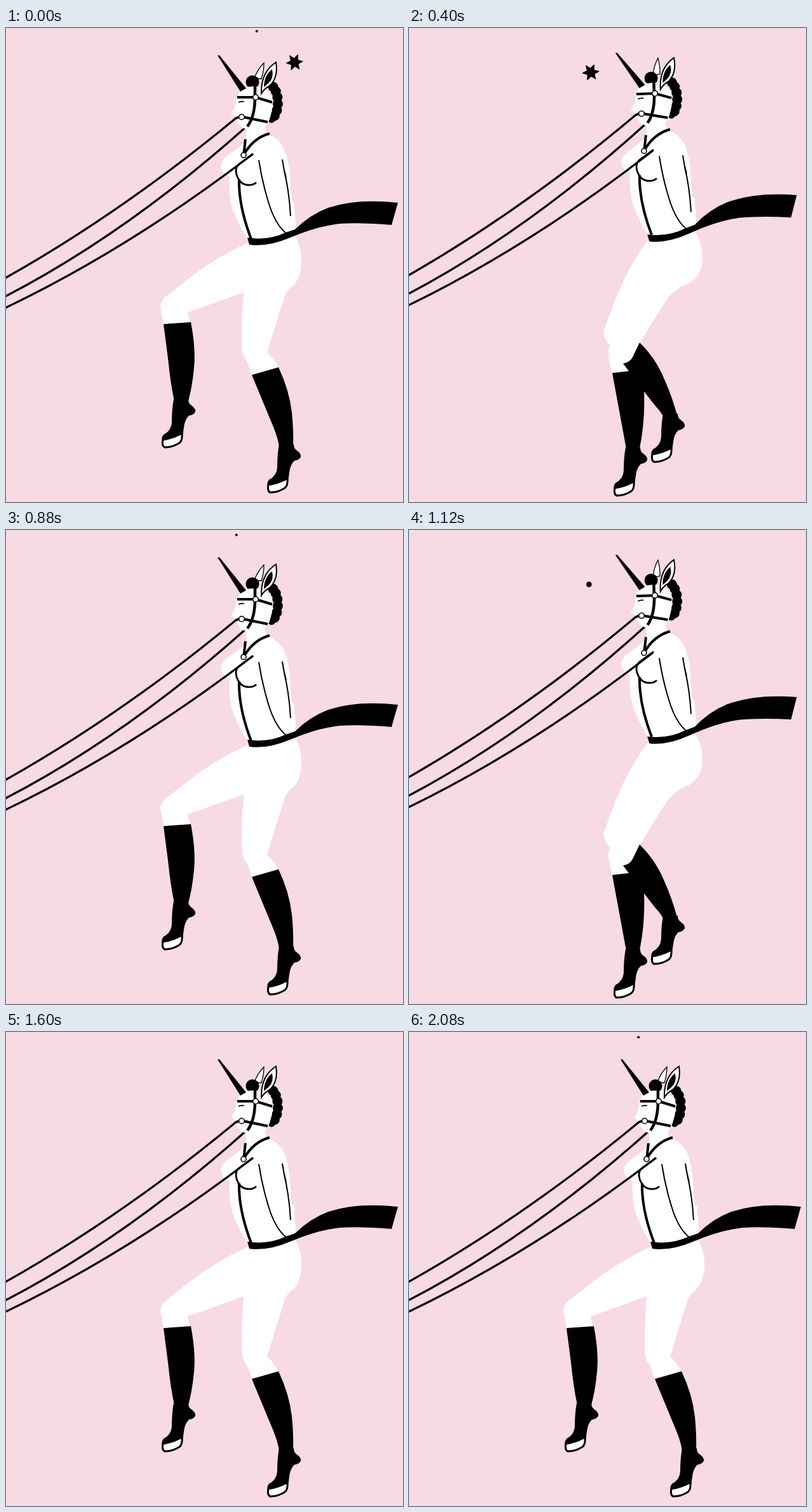
Write an HTML page that moves like this. It is 625x746 px and loops after 2160 ms.

```html
<!DOCTYPE html>
<html lang="en">
<head>
<meta charset="utf-8">
<title>Prancing unicorn</title>
<style>
  html, body { margin: 0; width: 100%; height: 100%; overflow: hidden; background: #f8dae2; }
  svg { display: block; width: 100vw; height: 100vh; }
  .line { fill: none; stroke: #000; stroke-linejoin: round; }
  .white { fill: #fff; }
  .ring { fill: #fff; stroke: #000; stroke-width: 1.6; }
</style>
</head>
<body>
<svg viewBox="0 0 625 746" preserveAspectRatio="none">
  <defs>
    <g id="shoe">
      <path d="M264 584H287Q287 591 292 594Q299 599 298 604Q296 609 288 610Q281 617 280 629L278 643L246 652Q244 645 248 640Q260 634 261 621Q261 600 264 584Z"/>
      <path class="white" d="M247 648Q262 646 277 638Q278 649 273 653Q262 660 250 660Q245 658 247 648Z" stroke="#000" stroke-width="3" stroke-linejoin="round"/>
    </g>
  </defs>

  <g id="high">
    <path class="white" d="M383 337Q330 361 288 394L251 423Q243 430 243 440Q246 452 248 468L290 465Q288 454 285 448L374 416Q371 450 371 485Q371 510 374 517Q382 526 387 548L430 536Q421 519 411 511Q425 465 440 418Q444 411 453 404Q462 396 465 373Q467 350 456 328Z"/>
    <path d="M248 466L291 463Q299 505 296 535Q293 566 287 587H265Q259 560 255 520Z"/>
    <path d="M387 546L429 534Q446 570 450 605Q453 635 452 659H430Q428 645 421 628Z"/>
    <use href="#shoe"/>
    <use href="#shoe" x="166" y="71"/>
  </g>
  <g id="passing">
    <path class="white" d="M378 331Q346 374 326 424L306 478Q306 489 316 499Q312 512 316 526L320 546H350V546L363 497Q385 459 408 424Q417 414 430 406Q442 402 448 396Q461 385 462 365Q463 339 450 320Z"/>
    <path d="M320 543L346 540L337 528Q348 526 352 518L363 495Q389 520 403 555Q414 580 422 609L401 613Q396 603 388 595L370 572Q372 618 363 662H342Z"/>
    <use href="#shoe" x="136" y="23"/>
    <use href="#shoe" x="77" y="76"/>
  </g>

  <g class="torso">
    <path class="white" d="M378 150L408 148Q405 158 412 167Q430 174 438 190Q446 210 447 235Q448 256 450 271Q455 274 454 282Q455 295 456 309Q456 321 447 324L440 334L383 338Q365 307 357 286Q350 263 352 234Q340 230 338 218Q338 209 351 199Q367 189 378 177Z"/>
  </g>
  <path id="reins" class="line" stroke-width="3.3"/>
  <g class="torso">
    <g class="line" stroke-width="4">
      <path d="M415 166Q389 173 374 200M377 175L374 201M367 238Q366 280 386 332"/>
      <path d="M389 198L366 215Q360 221 363 231Q368 246 380 247Q389 248 394 243" stroke-width="2.8"/>
      <path d="M398 208Q404 247 416 283Q426 311 441 323M435 207Q437 222 441 236M438 225Q446 258 448 296" stroke-width="2"/>
    </g>
    <circle class="ring" cx="374" cy="200" r="4"/>
  </g>

  <path id="tail" d="M380 330Q413 335 440 322L455 317Q478 294 507 283Q552 268 617 275L607 310Q560 306 525 308Q490 312 447 330Q412 345 383 341Z"/>

  <g id="head">
    <path id="back-ear" d="M391 79Q396 65 406 55Q406 68 402 80Z" fill="#fff" stroke="#000" stroke-width="1.3"/>
    <circle cx="388" cy="85" r="10.5"/>
    <g id="curls"></g>
    <path class="white" d="M367 101Q374 92 389 92Q410 92 418 108Q423 122 413 149L405 160L380 160Q367 156 366 150Q362 147 363 142Q361 138 354 135Q362 124 363 111Z"/>
    <path d="M333 43H336L378 95L369 100Z"/>
    <g class="line" stroke-width="4">
      <path d="M364 109H393L419 117M362 142Q367 139 373 140L412 148"/>
      <path d="M392 91V109Q392 139 380 155" stroke-width="4.5"/>
      <path d="M366 117Q371 115 375 116" stroke-width="1.8"/>
    </g>
    <path d="M402 98Q403 68 425 54Q429 78 415 91Q407 95 402 103Z" fill="#fff" stroke="#000" stroke-width="2"/>
    <path d="M406 93Q406 75 419 65Q422 79 413 87Z"/>
    <circle class="ring" cx="393" cy="109" r="4.3"/>
    <circle class="ring" cx="371" cy="140" r="4.3"/>
  </g>
  <g id="sparks"></g>
</svg>
<script>
const LOOP = 2160, STEP = 80, STRIDE = 720;
const $ = id => document.getElementById(id);
const range = (n, fn) => Array.from({ length: n }, (_, i) => fn(i));
const circle = (x, y, r) => `<circle cx="${x}" cy="${y}" r="${r}"/>`;

// Curls run down the back of the head on an arc
$('curls').innerHTML = range(7, i => {
  const a = -1.05 + i * .38;
  return circle(413 + 15 * Math.cos(a), 117 + 28 * Math.sin(a), i < 6 ? 8 : 6);
}).join('');

// Sparks fly over the horn from left to right; angles are in quarter turns
const flights = [
  { start: 320, end: 960, from: .04, to: .95, lift: 85, peak: .15, spread: .38, spin: 0 },
  { start: 1120, end: 1600, from: .05, to: 1.2, lift: 55, peak: .6, spread: .62, spin: .8 },
  { start: 1760, end: 2240, from: .02, to: 1.23, lift: 85, peak: .2, spread: .45, spin: 0 },
  { start: 2160, end: 2400, from: 1.41, to: 1.7, lift: 45, peak: 1.41, spread: .2, spin: 0 }
];

function spark(f, t) {
  if (t < f.start) t += LOOP;
  if (t >= f.end) return '';
  const turn = f.from + (f.to - f.from) * (t - f.start) / (f.end - f.start);
  const angle = turn * Math.PI / 2;
  const x = 390 - 107 * Math.cos(angle), y = 90 - f.lift * Math.sin(angle);
  const bloom = Math.max(0, 1 - ((turn - f.peak) / f.spread) ** 2);
  const r = 2 + 11 * bloom;
  if (bloom < .25) return circle(x, y, r);
  const points = range(12, i => {
    const a = i * Math.PI / 6, d = i % 2 ? r * .48 : r;
    return `${d * Math.sin(a)},${-d * Math.cos(a)}`;
  });
  const tilt = 24 + 12 * f.spin;
  return `<polygon points="${points.join(' ')}" stroke="#000" stroke-linejoin="round"
    transform="translate(${x} ${y}) rotate(${tilt}) scale(${1 - f.spin * turn} 1)"/>`;
}

const rein = (y0, x, y, sag) =>
  `M-2 ${y0 + 1}Q${x / 2} ${(y0 + y) / 2 + 2 * sag} ${x} ${y}`;

function setPose(low) {
  $('high').style.display = low ? 'none' : '';
  $('passing').style.display = low ? '' : 'none';
  const move = (el, value) => el.setAttribute('transform', low ? value : '');
  document.querySelectorAll('.torso').forEach(el => move(el, 'translate(-4 -6.5)'));
  move($('head'), 'translate(-6 -6) rotate(-2 393 109)');
  move($('back-ear'), 'rotate(-14 397 79)');
  move($('tail'), 'translate(-5 -7) rotate(-1.7 447 325)');
  const lift = low ? 4 : 0, shift = low ? 5 : 0;
  $('reins').setAttribute('d', rein(393 - lift, 363 - shift, 141 - shift, 12)
    + rein(422 - lift, 382 - shift, 152 - shift, 18)
    + rein(440 - lift, 389 - shift, 198 - shift, 14));
}

function render(ms) {
  const t = Math.floor(ms % LOOP / STEP) * STEP;
  const phase = t % STRIDE;
  setPose(phase >= 320 && phase < 640);
  $('sparks').innerHTML = flights.map(f => spark(f, t)).join('');
}

const start = performance.now();
function tick() {
  render(performance.now() - start);
  requestAnimationFrame(tick);
}
tick();
</script>
</body>
</html>
```
